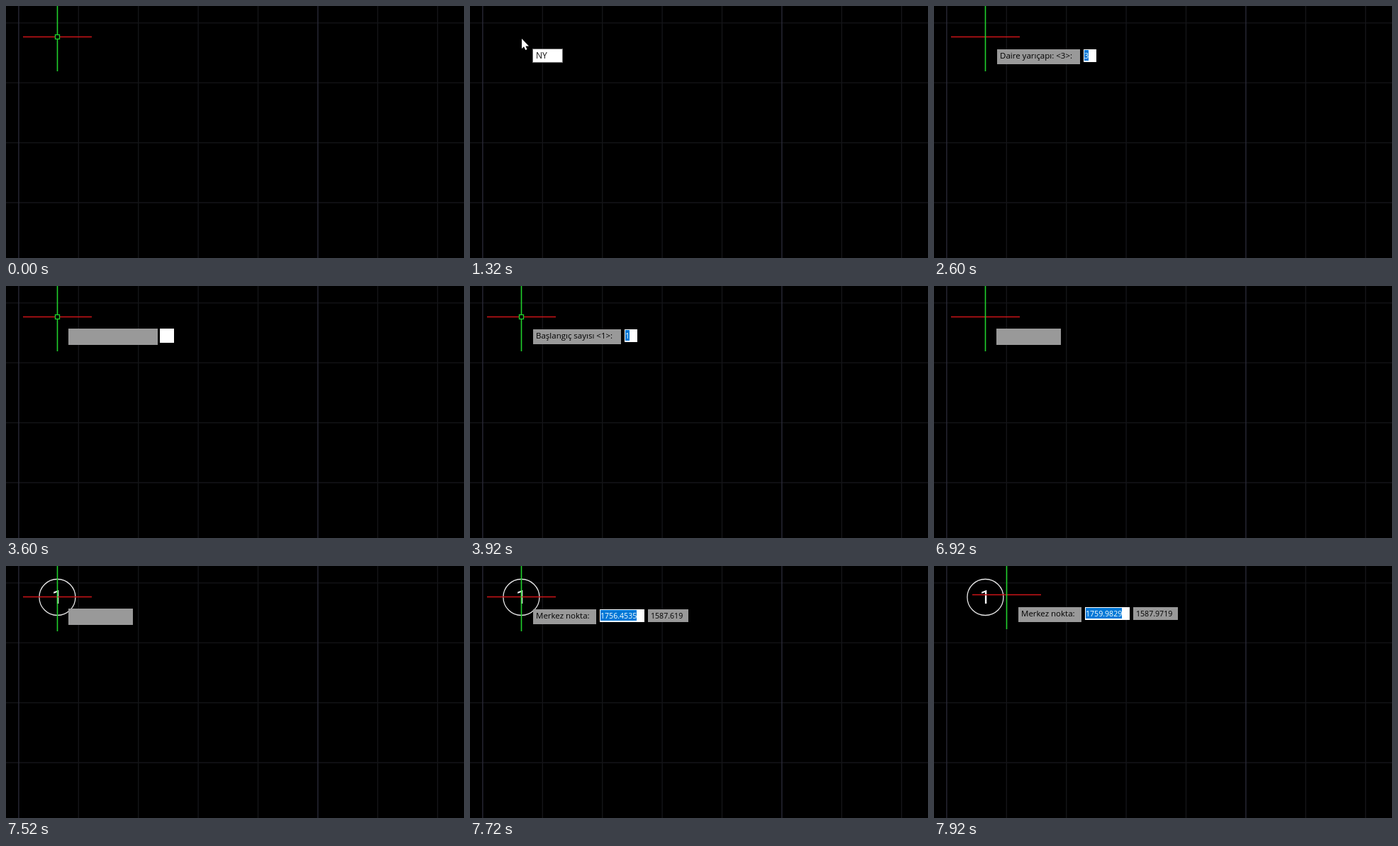
Recreate the animation shown at these times as an HTML page with a canvas. Size 646 by 355 pixels, loop 8000 ms.

```html
<!DOCTYPE html>
<html lang="tr">
<head>
<meta charset="utf-8">
<style>
  html, body { margin: 0; width: 100%; height: 100%; overflow: hidden; background: #000; }
  canvas { display: block; }
</style>
</head>
<body>
<canvas id="stage" width="646" height="355"></canvas>
<script>
const ctx = document.getElementById('stage').getContext('2d');
const W = 646, H = 355, LOOP = 8000;
const HOME = [72, 43];
const GRAY = '#999999', BLUE = '#0078d7', RED = '#cc1418', GREEN = '#20d02c';
const MINOR = '#141518', MAJOR = '#282936';
const UI = '"Open Sans", "Noto Sans", sans-serif';
const PANEL = { x: 17, y: 18, h: 21, fieldH: 18, gap: 5 };

function rect(x, y, w, h, color) {
  ctx.fillStyle = color;
  ctx.fillRect(x, y, w, h);
}

function line(x1, y1, x2, y2, color, width) {
  ctx.strokeStyle = color;
  ctx.lineWidth = width;
  ctx.beginPath();
  ctx.moveTo(x1, y1);
  ctx.lineTo(x2, y2);
  ctx.stroke();
}

function text(str, x, y, color, size = 11.5, family = UI) {
  ctx.font = `${size}px ${family}`;
  ctx.fillStyle = color;
  ctx.fillText(str, x, y);
}

function grid() {
  rect(0, 0, W, H, '#000');
  const step = 84.4;
  for (let y = 23.8; y < H; y += step) line(0, y, W, y, MINOR, 1.3);
  for (let i = 0; i < 8; i++) {
    const x = 17.9 + i * step;
    line(x, 0, x, H, i % 5 ? MINOR : MAJOR, 1.4);
  }
}

function crosshair([px, py], pickbox) {
  const x = px + 0.5, y = py + 0.5;
  line(x - 48.5, y, x + 48.5, y, RED, 1.6);
  line(x, 0, x, y + 48.5, GREEN, 1.6);
  if (pickbox) {
    rect(x - 3, y - 3, 6, 6, '#000');
    ctx.strokeStyle = GREEN;
    ctx.lineWidth = 1.3;
    ctx.strokeRect(x - 3, y - 3, 6, 6);
  }
}

function arrow() {
  ctx.fillStyle = '#fff';
  ctx.beginPath();
  [[73, 46], [73, 60], [76, 57.3], [78.3, 62], [80.5, 61], [78.4, 56.6], [83, 56.6]]
    .forEach(([x, y]) => ctx.lineTo(x, y));
  ctx.fill();
}

function commandBox(caret) {
  rect(88, 60, 43, 20, '#6e6e6e');
  rect(89, 61, 41, 18, '#fff');
  text('NY', 93, 74, '#111', 12);
  if (caret) rect(109, 62, 1, 15, '#000');
}

function valueWidth(str) {
  return [...str].reduce((w, c) => w + (c === '.' ? 3 : 6), 0);
}

// Draws one value box and returns its right edge.
function field(str, x, y, selected) {
  const w = valueWidth(str), size = 10.6;
  rect(x, y, w + 12, PANEL.fieldH, selected ? '#fff' : GRAY);
  if (selected) rect(x + 1, y + 1, w, 15, BLUE);
  text(str, x + (selected ? 1 : 4), y + 13, selected ? '#fff' : '#000', size);
  return x + w + 12;
}

function prompt([cx, cy], label, width, values) {
  const x = cx + PANEL.x, y = cy + PANEL.y;
  rect(x, y, width, PANEL.h, GRAY);
  text(label, x + 4, y + 13, '#000');
  let right = x + width;
  values.forEach((v, i) => { right = field(v, right + PANEL.gap, y, i === 0); });
}

function blankPanel(width) {
  rect(88, 60, width + 2, PANEL.h + 2, GRAY);
}

function balloon() {
  ctx.strokeStyle = '#e6e6e6';
  ctx.lineWidth = 1.3;
  ctx.beginPath();
  ctx.arc(72.4, 44, 25.5, 0, Math.PI * 2);
  ctx.stroke();
  text('1', 65, 53, '#fff', 26, 'Roboto, sans-serif');
}

function centerPrompt(pos) {
  const scale = 8.5;
  const coords = [
    1759.9829 + (pos[0] - 102) / scale,
    1587.9719 + (40 - pos[1]) / scale
  ].map(v => String(+v.toFixed(4)));
  prompt(pos, 'Merkez nokta:', 89, coords);
}

function moving(pos) {
  balloon();
  crosshair(pos);
  centerPrompt(pos);
}

const scenes = [
  [0, () => crosshair(HOME, true)],
  [320, () => { commandBox(true); arrow(); }],
  [1320, () => { commandBox(false); arrow(); }],
  [2320, () => commandBox(false)],
  [2600, () => {
    crosshair(HOME);
    prompt(HOME, 'Daire yarıçapı: <3>:', 117, ['3']);
  }],
  [3600, () => {
    crosshair(HOME, true);
    blankPanel(124);
    rect(217, 60, 20, 20, '#fff');
  }],
  [3920, () => {
    crosshair(HOME, true);
    prompt(HOME, 'Başlangıç sayısı <1>:', 124, ['1']);
  }],
  [5400, () => {
    crosshair(HOME, true);
    prompt(HOME, 'Artış sayısı <1>:', 98, ['1']);
  }],
  [6920, () => { crosshair(HOME); blankPanel(89); }],
  [7200, () => { crosshair(HOME); centerPrompt(HOME); }],
  [7520, () => { balloon(); crosshair(HOME); blankPanel(89); }],
  [7600, () => moving(HOME)],
  [7760, () => moving([79, 43])],
  [7840, () => moving([92, 41])],
  [7920, () => moving([102, 40])]
];

const start = performance.now();

function draw(now) {
  const t = Math.max(0, now - start) % LOOP;
  grid();
  scenes.filter(([at]) => at <= t).pop()[1]();
  requestAnimationFrame(draw);
}
draw(start);
</script>
</body>
</html>
```
